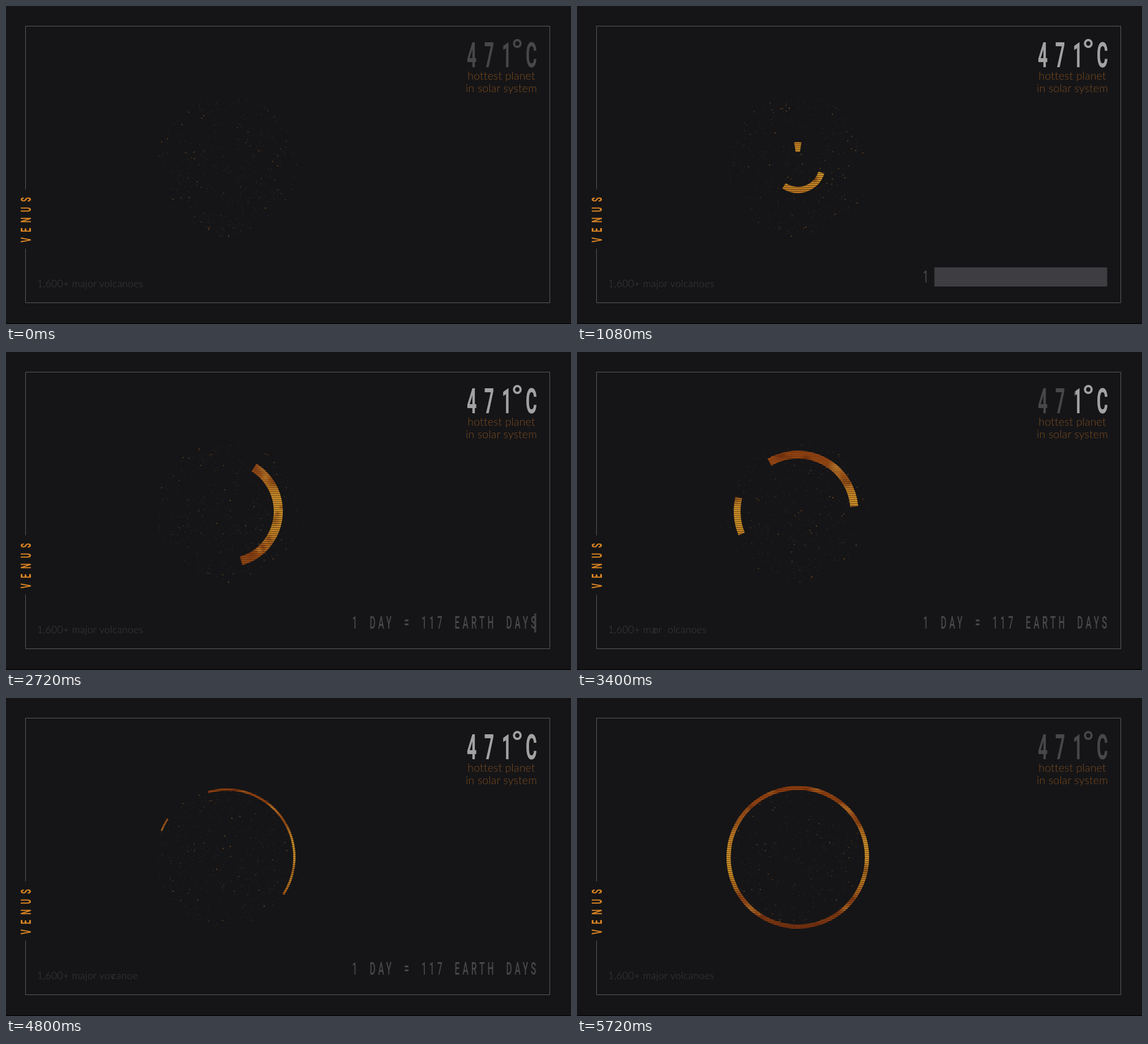
An HTML page with a canvas that plays this animation: 998x561 px, repeating every 5760 ms.

```html
<!DOCTYPE html>
<html lang="en">
<head>
<meta charset="utf-8">
<title>Venus</title>
<style>
  html, body { margin: 0; width: 100%; height: 100%; overflow: hidden; background: #151517; }
  canvas, svg { position: absolute; left: 0; top: 0; display: block; }
  text { white-space: pre; }
  .display { font-family: Roboto, "Liberation Sans", sans-serif; font-weight: 700; }
  .thin { font-family: Lato, "Open Sans", sans-serif; font-weight: 300; }
  .temp { font-size: 60.5px; letter-spacing: 27px; }
  .degree { font-size: 62px; font-weight: 400; letter-spacing: 0; text-anchor: middle; }
  .day { font-size: 31px; letter-spacing: 10px; word-spacing: 16.6px; font-weight: 500; fill: #48484b; }
  .name { font-size: 26.7px; letter-spacing: 18.5px; fill: #d98422; }
  .fact { font-size: 19.4px; letter-spacing: .2px; fill: #7c4b20; text-anchor: middle; }
  .volcano { font-size: 17.5px; letter-spacing: .32px; fill: #3d3d3f; }
</style>
</head>
<body>
<canvas id="stage" width="998" height="561"></canvas>
<svg width="998" height="561" viewBox="0 0 998 561">
  <defs>
    <clipPath id="sweep"><rect id="sweepBox" y="50" height="65"/></clipPath>
    <clipPath id="wipe"><rect id="wipeBox" y="455" width="400" height="45"/></clipPath>
    <pattern id="lines" width="8" height="3" y="461" patternUnits="userSpaceOnUse">
      <rect width="8" height="3" fill="#424246"/>
      <rect width="8" height="1" fill="#353539"/>
    </pattern>
    <g id="temp" class="display temp">
      <text transform="translate(814 108) scale(.5 1)">471</text>
      <text class="degree" x="903" y="103">°</text>
      <text transform="translate(918 108) scale(.5 1)" letter-spacing="0">C</text>
    </g>
  </defs>
  <path d="M34.5 323.5V35.5H960.5V523.5H34.5V428" fill="none" stroke="#5a5a5c"/>
  <rect y="560" width="998" height="1" fill="#000"/>
  <text class="display name" transform="translate(44 417) rotate(-90) scale(.5 1)">VENUS</text>
  <use href="#temp" fill="#474749"/>
  <g clip-path="url(#sweep)"><use href="#temp" fill="#a2a2a3"/></g>
  <text class="thin fact" x="875" y="130">hottest planet</text>
  <text class="thin fact" x="875" y="152">in solar system</text>
  <text class="thin volcano" id="volcano" x="55" y="495.5"></text>
  <rect id="bar" y="461" height="34" fill="url(#lines)"/>
  <g clip-path="url(#wipe)">
    <text class="display day" id="day" transform="translate(611.5 488) scale(.5 1)"></text>
  </g>
</svg>
<script>
const LOOP = 5760, CX = 390, CY = 281, R = 126, TAU = Math.PI * 2;
const DAY = "1 DAY = 117 EARTH DAYS";
const VOLCANO = "1,600+ major volcanoes";
const $ = id => document.getElementById(id);
const ctx = $("stage").getContext("2d");

// Each sweep: time it lights up, time it dims again.
const SWEEPS = [[140, 1080], [1985, 3015], [3900, 4950]];
const SWEEP_MS = 715;

// Ring segments: time, inner radius, outer radius, start and end angle in degrees.
const RINGS = [
  [
    [420, 0, 0, 40, 100], [1080, 38, 49, 17, 124], [2080, 55, 83, 58, 126],
    [2720, 83, 99, -58, 74], [3400, 93, 107, -120, -5],
    [4800, 117.5, 121.5, -106, 33], [5680, 118.5, 126, -106, 254], [5760, 118.5, 126, -106, 254]
  ],
  [
    [640, 8, 18, -90, -90], [1080, 24, 41, -99, -81], [2080, 41, 59, -107, -73],
    [2560, 60, 76, -90, -90]
  ],
  [
    [2960, 94, 107, 150, 150], [3400, 101, 113, 158, 193],
    [4800, 123, 126, 202, 213], [5160, 124, 126, 216, 216]
  ]
];

// Short letter slips; "~" pulls the next letter back over the previous one.
const SLIPS = [
  [240, "1,600 major volcanoes"], [440, "1,600+ maor vlcanoes"],
  [720, "1,60~+ major volanoes"], [880, "1,600+ mjor volc~noes"],
  [2240, "1,600+ major vo~canoes"], [2480, "1,600+ ajor volcnoes"],
  [3320, "1,600+ ma~or  olcanoes"], [3880, "1,600+ m~jor volcanes"],
  [4320, "1,00+ major volcaoes"], [4760, "1,600+ major vov~canoe"],
  [5120, "1,600+ maj~r volcanoes"], [5520, "1,600+ major olc~noes"]
];
const SLIP_MS = 120;

const clamp = u => Math.max(0, Math.min(1, u));
const span = (t, start, ms) => clamp((t - start) / ms);
const smooth = u => (1 - Math.cos(Math.PI * u)) / 2;

function seeded(seed) {
  return () => {
    seed = (seed * 1664525 + 1013904223) % 4294967296;
    return seed / 4294967296;
  };
}

const rnd = seeded(71);
const dots = Array.from({ length: 900 }, () => {
  const r = R * Math.sqrt(rnd()), a = rnd() * TAU, hot = rnd() < .15;
  return {
    x: CX + r * Math.cos(a), y: CY + r * Math.sin(a), hot,
    size: hot ? 1.2 + rnd() * .5 : .8 + rnd() * .5,
    turns: 1 + Math.floor(rnd() * 4), phase: rnd() * TAU
  };
});

function makeSurface() {
  const c = document.createElement("canvas");
  c.width = 998;
  c.height = 561;
  const g = c.getContext("2d");
  const base = g.createLinearGradient(0, CY - R, 0, CY + R);
  ["#96400f", "#a85217", "#d2932b", "#d0932a", "#a35218", "#7c3312"]
    .forEach((col, i) => base.addColorStop(i / 5, col));
  g.fillStyle = base;
  g.fillRect(0, 0, 998, 561);
  const rand = seeded(19);
  for (let i = 0; i < 140; i++) {
    const x = CX + (rand() * 2 - 1) * R, y = CY + (rand() * 2 - 1) * R, r = 4 + rand() * 13;
    const tone = rand() < .6 ? "105,38,12" : "232,165,60";
    const spot = g.createRadialGradient(x, y, 0, x, y, r);
    spot.addColorStop(0, `rgba(${tone},.5)`);
    spot.addColorStop(1, `rgba(${tone},0)`);
    g.fillStyle = spot;
    g.fillRect(x - r, y - r, r * 2, r * 2);
  }
  g.fillStyle = "rgba(30,14,4,.6)";
  for (let y = CY - R; y < CY + R; y += 3.5) g.fillRect(0, y, 998, 1.1);
  return ctx.createPattern(c, "no-repeat");
}
const surface = makeSurface();

function sample(keys, t) {
  if (t < keys[0][0] || t > keys[keys.length - 1][0]) return null;
  const i = keys.findIndex(k => k[0] >= t);
  if (i === 0) return keys[0].slice(1);
  const a = keys[i - 1], b = keys[i], u = (t - a[0]) / (b[0] - a[0]);
  return a.slice(1).map((v, n) => v + (b[n + 1] - v) * u);
}

function drawDots(t) {
  for (const d of dots) {
    const glow = .5 + .5 * Math.sin(d.phase + TAU * d.turns * t / LOOP);
    ctx.fillStyle = d.hot
      ? `rgba(205,120,45,${.7 * glow * glow})`
      : `rgba(130,112,98,${.36 * glow})`;
    ctx.fillRect(d.x, d.y, d.size, d.size);
  }
}

function drawRings(t) {
  ctx.strokeStyle = surface;
  for (const keys of RINGS) {
    const ring = sample(keys, t);
    if (!ring) continue;
    const [inner, outer, from, to] = ring;
    if (to - from < .1 || outer - inner < .1) continue;
    ctx.lineWidth = outer - inner;
    ctx.beginPath();
    ctx.arc(CX, CY, (inner + outer) / 2, from * TAU / 360, to * TAU / 360);
    ctx.stroke();
  }
}

function setBox(el, left, right) {
  el.setAttribute("x", left);
  el.setAttribute("width", Math.max(0, right - left));
}

function drawSweep(t) {
  const edge = start => 814 + 123 * span(t, start, SWEEP_MS);
  const [on, off] = SWEEPS.filter(s => s[0] <= t).pop() || SWEEPS[0];
  setBox($("sweepBox"), edge(off), edge(on));
}

function drawDay(t) {
  const count = Math.floor(DAY.length * span(t, 990, 1700));
  $("day").textContent = DAY.slice(0, count);
  $("wipeBox").setAttribute("x", 610 + 330 * span(t, 5420, 260));
  const left = 613 + 323.5 * smooth(span(t, 760, 2100));
  const right = 613 + 323.5 * smooth(span(t, 660, 380));
  setBox($("bar"), left, right);
}

let shown = null;
function drawVolcano(t) {
  const slip = SLIPS.find(s => t >= s[0] && t < s[0] + SLIP_MS);
  const label = slip ? slip[1] : VOLCANO;
  if (label === shown) return;
  shown = label;
  const [head, tail] = label.split("~");
  const el = $("volcano");
  el.textContent = head;
  if (tail) {
    const part = document.createElementNS("http://www.w3.org/2000/svg", "tspan");
    part.setAttribute("dx", -6);
    part.textContent = tail;
    el.append(part);
  }
}

function draw(t) {
  ctx.fillStyle = "#151517";
  ctx.fillRect(0, 0, 998, 561);
  drawDots(t);
  drawRings(t);
  drawSweep(t);
  drawDay(t);
  drawVolcano(t);
}

const began = performance.now();
function tick() {
  draw((performance.now() - began) % LOOP);
  requestAnimationFrame(tick);
}
tick();
</script>
</body>
</html>
```
